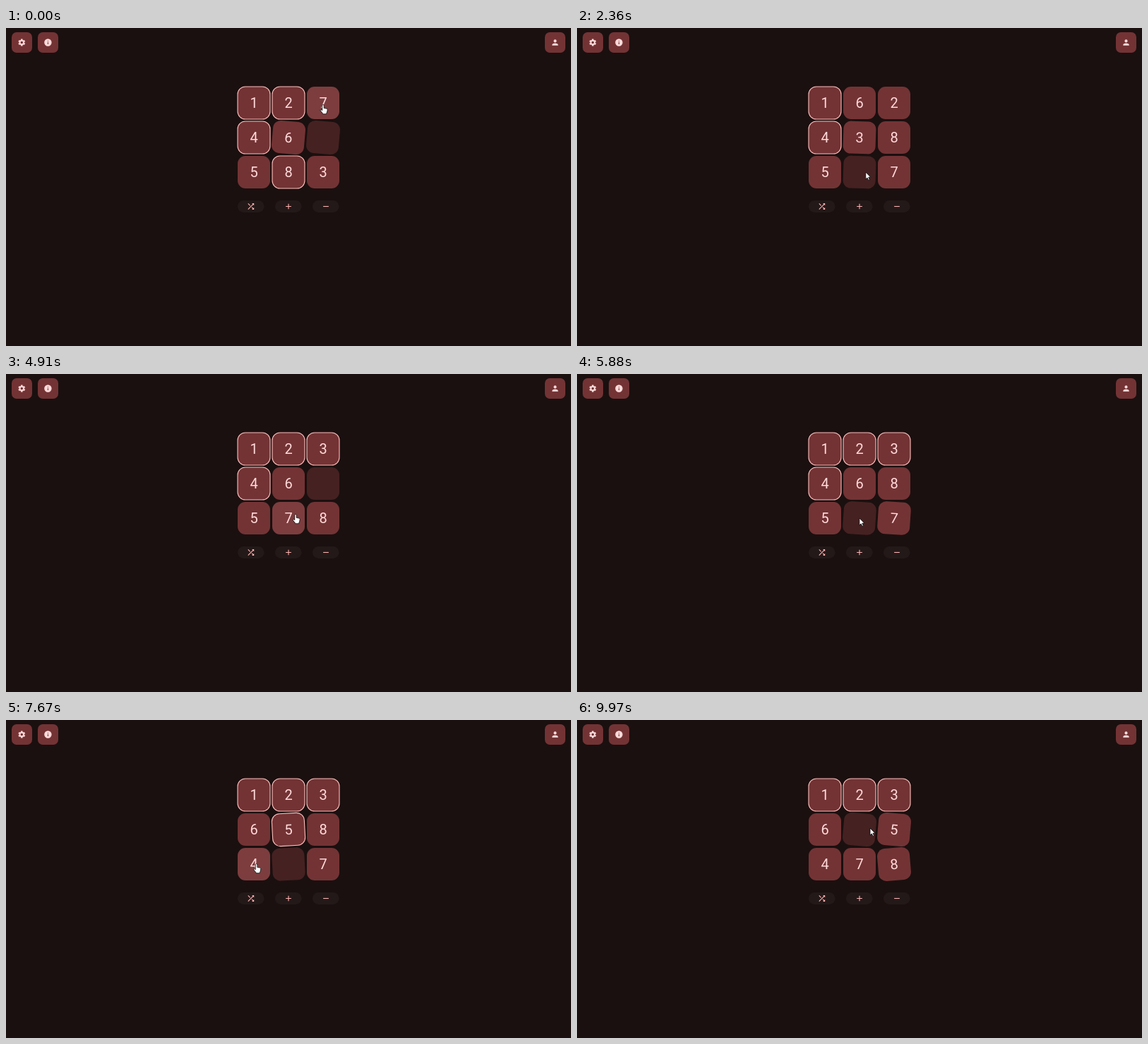
Write an HTML page that moves like this. It is 800 by 450 pixels and loops after 10000 ms.

```html
<!DOCTYPE html>
<html lang="en">
<head>
<meta charset="utf-8">
<title>Sliding puzzle</title>
<style>
  html, body { margin: 0; width: 100%; height: 100%; overflow: hidden; background: #1a100f; }
  svg { display: block; width: 800px; height: 450px; }
  .button { fill: #733335; }
  .pill { fill: #231918; }
  .light { fill: #ffdad9; stroke: #ffdad9; stroke-width: 0; }
  .pink { fill: #ffb3b2; }
  .tile rect { fill: #733335; }
  .tile.hover rect { fill: #7d3d3f; }
  .tile.home rect { stroke: #ffc0be; stroke-width: 1.1; }
  .tile.blank rect { fill: #462122; }
  .tile text { font: 20px Roboto, sans-serif; fill: #ffdad9; text-anchor: middle; }
  .cursor { fill: #fff; stroke: #000; stroke-width: .8; stroke-linejoin: round; }
</style>
</head>
<body>
<svg viewBox="0 0 800 450">
  <g class="button">
    <rect x="8" y="6" width="29" height="29" rx="7"/>
    <rect x="45" y="6" width="29" height="29" rx="7"/>
    <rect x="763" y="6" width="29" height="29" rx="7"/>
  </g>
  <g class="light">
    <g transform="translate(22.3 20.5) scale(.52)">
      <circle r="5.2" fill="none" stroke-width="3.6"/>
      <path id="teeth" d="M0 -9.6V-6M0 9.6V6" stroke-width="5"/>
      <use href="#teeth" transform="rotate(60)"/>
      <use href="#teeth" transform="rotate(120)"/>
    </g>
    <path transform="translate(59.4 20.5) scale(.52) translate(-12 -12)" fill-rule="evenodd"
      d="M12 2a10 10 0 1 0 0 20a10 10 0 1 0 0-20zM13 17h-2v-6h2zM13 9h-2V7h2z"/>
    <path transform="translate(777.5 20.5) scale(.52) translate(-12 -12)"
      d="M12 4a4 4 0 1 0 0 8a4 4 0 1 0 0-8zM12 14c-2.7 0-8 1.3-8 4v2h16v-2c0-2.7-5.3-4-8-4z"/>
  </g>
  <g class="pill">
    <rect x="328" y="244" width="37.5" height="17" rx="8.5"/>
    <rect x="381" y="244" width="37.5" height="17" rx="8.5"/>
    <rect x="434" y="244" width="37.5" height="17" rx="8.5"/>
  </g>
  <g class="pink">
    <path transform="translate(346.8 252.5) scale(.55) translate(-12 -12)"
      d="M10.6 9.2 5.4 4 4 5.4l5.2 5.2zM14.5 4l2 2L4 18.6 5.4 20 18 7.5l2 2V4zM14.8 13.4l-1.4 1.4 3.1 3.2-2 2H20v-5.5l-2 2z"/>
    <path transform="translate(400 252.5) scale(.55)" d="M-7-1h6v-6h2v6h6v2H1v6h-2V1h-6z"/>
    <path transform="translate(453 252.5) scale(.55)" d="M-7-1H7v2H-7z"/>
  </g>
  <g id="board"></g>
  <g id="cursor" class="cursor">
    <path transform="translate(1 -.4) scale(.95)"
      d="M-1.3 1.2a1.3 1.3 0 0 1 2.6 0V5l4 .8q1.3.4 1.2 1.6l-.6 3.6-.9 1.6v1.2H-.8v-1.2L-4 8.8q-.5-1.5.9-1.5l1.8 1.1z"/>
    <path d="M0 0V10l2.3-2.1 1.6 3.5 1.7-.8-1.6-3.4h3.1z"/>
  </g>
</svg>
<script>
  const LOOP = 10000, SHAKE = 300, HOVER_DELAY = 80, SIZE = 46, PITCH = 49;
  const START = '127460583';

  // Evenly spaced runs of clicks: first time, step, tiles clicked
  const clicks = [
    ...run(120, 300, '7268'),
    ...run(1560, 245, '378378'),
    ...run(3520, 225, '3623'),
    ...run(5500, 360, '87'),
    ...run(6590, 280, '546546'),
    ...run(9070, 215, '64785')
  ];

  // Where the pointer rests or wanders between runs
  const stops = [
    { time: 0, x: 448, y: 109 },
    { time: 1420, x: 395, y: 169 },
    { time: 3300, x: 447, y: 150 },
    { time: 3450, x: 400, y: 147 },
    { time: 4560, x: 340, y: 239 },
    { time: 4910, x: 409, y: 199 },
    { time: 8550, x: 433, y: 167 },
    { time: 9970, x: 415, y: 153 }
  ];

  function run(first, step, tiles) {
    return [...tiles].map((tile, i) => ({ time: first + i * step, tile }));
  }

  const centre = cell => ({
    x: 400 + (cell % 3 - 1) * PITCH,
    y: 155 + (Math.floor(cell / 3) - 1) * PITCH
  });

  // A clicked tile trades places with the gap, and both cells shake
  function boardAt(t) {
    const tiles = [...START], shaken = tiles.map(() => -SHAKE);
    shaken[4] = shaken[5] = -190;
    for (const { time, tile } of clicks) {
      if (time > t) break;
      const from = tiles.indexOf(tile), to = tiles.indexOf('0');
      tiles[to] = tile;
      tiles[from] = '0';
      shaken[from] = shaken[to] = time;
    }
    return { tiles, shaken };
  }

  const path = clicks.map(({ time, tile }) => {
    const cell = boardAt(time - 1).tiles.indexOf(tile);
    return { time, ...centre(cell) };
  }).concat(stops).sort((a, b) => a.time - b.time);

  function pointerAt(t) {
    const i = path.findIndex(p => p.time > t);
    if (i < 0) return path[path.length - 1];
    const a = path[i - 1], b = path[i];
    const k = (t - a.time) / (b.time - a.time), ease = k * k * (3 - 2 * k);
    return { x: a.x + (b.x - a.x) * ease, y: a.y + (b.y - a.y) * ease };
  }

  function cellAt({ x, y }) {
    return [...START].findIndex((_, cell) => {
      const c = centre(cell);
      return Math.max(Math.abs(x - c.x), Math.abs(y - c.y)) < SIZE / 2;
    });
  }

  function add(parent, name, attrs = {}) {
    const el = document.createElementNS('http://www.w3.org/2000/svg', name);
    for (const key in attrs) el.setAttribute(key, attrs[key]);
    return parent.appendChild(el);
  }

  const board = document.getElementById('board');
  const cursor = document.getElementById('cursor');
  const [hand, arrow] = cursor.children;
  const cells = [...START].map(() => {
    const group = add(board, 'g');
    add(group, 'rect', { x: -SIZE / 2, y: -SIZE / 2, width: SIZE, height: SIZE, rx: 11 });
    return { group, label: add(group, 'text', { y: 7 }) };
  });

  function draw(t) {
    const { tiles, shaken } = boardAt(t);
    const pointer = pointerAt(t);
    const hovered = cellAt(pointerAt(Math.max(0, t - HOVER_DELAY)));

    cells.forEach(({ group, label }, i) => {
      const blank = tiles[i] === '0', age = t - shaken[i];
      const angle = age < SHAKE ? 5 * Math.sin(age / SHAKE * 4 * Math.PI) : 0;
      const { x, y } = centre(i);
      group.setAttribute('class', 'tile');
      group.classList.toggle('blank', blank);
      group.classList.toggle('home', +tiles[i] === i + 1);
      group.classList.toggle('hover', !blank && i === hovered);
      group.setAttribute('transform', `translate(${x} ${y}) rotate(${angle})`);
      label.textContent = blank ? '' : tiles[i];
    });

    const over = cellAt(pointer);
    const clickable = over >= 0 && tiles[over] !== '0';
    hand.style.display = clickable ? '' : 'none';
    arrow.style.display = clickable ? 'none' : '';
    cursor.setAttribute('transform', `translate(${pointer.x} ${pointer.y})`);
  }

  const begin = performance.now();
  function frame() {
    draw((performance.now() - begin) % LOOP);
    requestAnimationFrame(frame);
  }
  frame();
</script>
</body>
</html>
```
